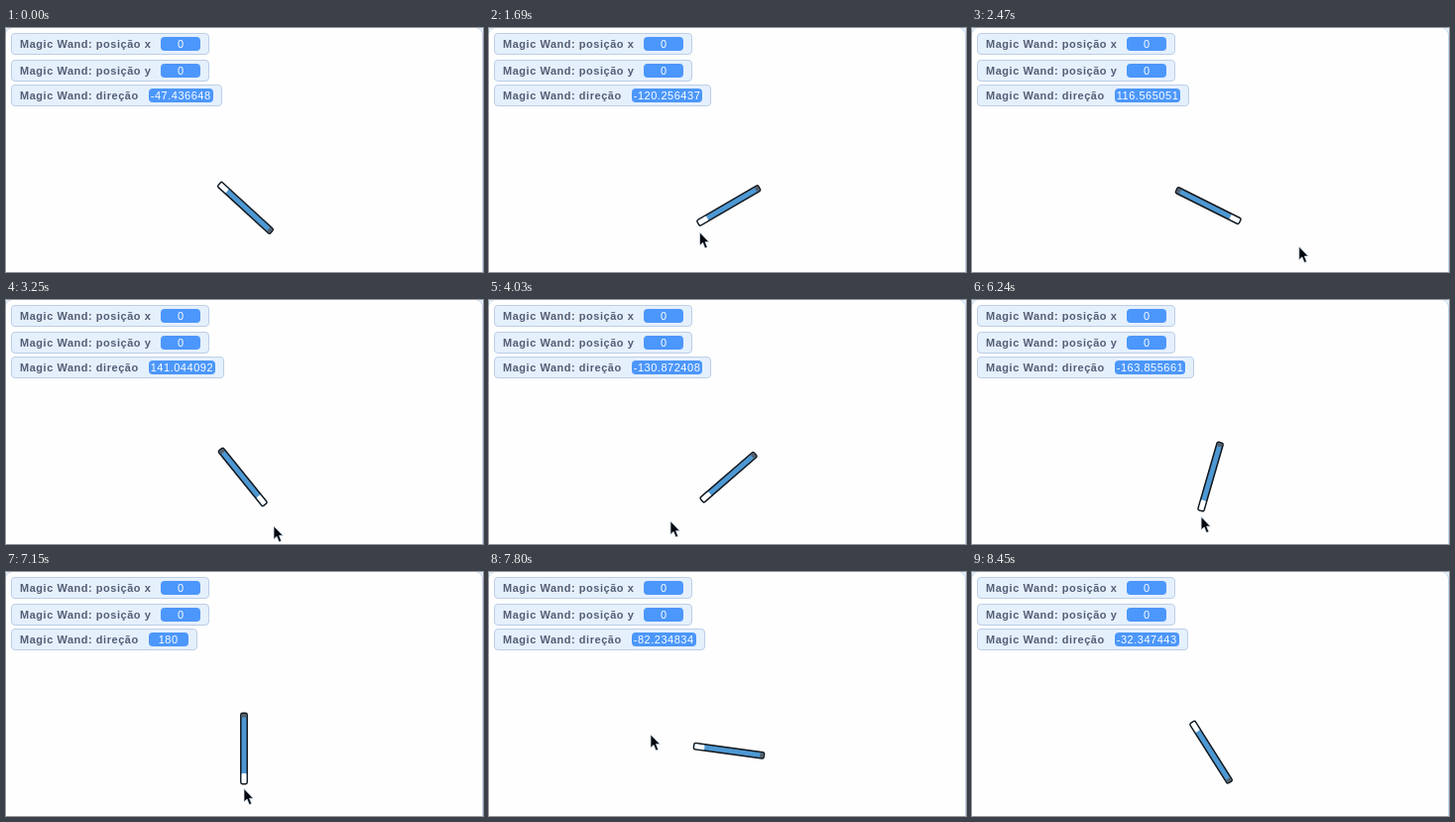
An HTML page for the animation above (8.58 s loop, 481 by 246 pixels).

```html
<!DOCTYPE html>
<html lang="pt">
<head>
<meta charset="utf-8">
<title>Magic Wand</title>
<style>
  html, body { margin: 0; width: 100%; height: 100%; overflow: hidden; background: #e5f0ff; }
  .view { position: relative; width: 100%; height: 100%; overflow: hidden; }
  .stage {
    position: absolute; inset: -1px 0 -10px -1px;
    background: #fefefe; border: 1px solid #c6d9f1; border-radius: 8px;
  }
  .monitor {
    position: absolute; left: 5px; height: 22px; box-sizing: border-box; padding: 3px;
    display: flex; white-space: nowrap;
    font: 11px/14px "Liberation Sans", Arial, sans-serif; letter-spacing: .53px;
    background: #e5f0fd; border: 1px solid #bccfe6; border-radius: 4px;
  }
  .monitor b { margin: 0 5px; color: #535e75; }
  .monitor span {
    min-width: 40px; box-sizing: border-box; margin: 0 5px; padding: 0 2px;
    color: #fff; background: #4c97fb; border-radius: 4px; text-align: center;
  }
  svg { position: absolute; inset: 0; width: 100%; height: 100%; }
</style>
</head>
<body>
<div class="view">
  <div class="stage"></div>
  <svg>
    <g id="wand">
      <rect x="-3.2" y="-33.7" width="6.4" height="71.4" rx="1.6" fill="#4d98d3" stroke="#14171c" stroke-width="1.5"/>
      <rect x="-2.4" y="-32.9" width="4.8" height="10" rx=".8" fill="#fff"/>
      <rect x="-2.4" y="33.5" width="4.8" height="3.4" rx=".8" fill="#56616c"/>
    </g>
  </svg>
  <div class="monitor" style="top:5px"><b>Magic Wand: posição x</b><span>0</span></div>
  <div class="monitor" style="top:32px"><b>Magic Wand: posição y</b><span>0</span></div>
  <div class="monitor" style="top:57px"><b>Magic Wand: direção</b><span id="direction"></span></div>
  <svg>
    <path id="cursor" d="M0 .5V13.8L3.1 11L5.3 16.5L7.7 15.6L5.5 10.2H9.4Z"
          fill="#05090f" stroke="#d9e8f7" stroke-width=".7"/>
  </svg>
</div>
<script>
  const STEP = 130, STEPS = 66, LEAD = .5;
  const CENTER = { x: 240, y: 180 };

  // Pointer sweep: step, x, y
  const path = [
    [8.5, 44, -25], [11, 130, 170], [13, 204, 201], [15, 238, 219], [20, 340, 220],
    [25, 278, 227], [30, 198, 231], [35, 148, 203], [38, 180, 212], [48, 229, 218],
    [53, 250, 218], [55, 240, 218], [57, 240, 218], [62, 130, 140], [65, 126, -17]
  ];

  const wand = document.getElementById('wand');
  const cursor = document.getElementById('cursor');
  const readout = document.getElementById('direction');
  const clamp = (v, min, max) => Math.max(min, Math.min(max, v));

  function pointerAt(step) {
    const s = clamp(step, path[0][0], path.at(-1)[0]);
    const i = Math.max(1, path.findIndex(p => p[0] >= s));
    const [s0, x0, y0] = path[i - 1], [s1, x1, y1] = path[i];
    const k = (s - s0) / (s1 - s0);
    return { x: x0 + (x1 - x0) * k, y: y0 + (y1 - y0) * k };
  }

  // Degrees clockwise from up, using whole stage coordinates
  function headingTo(p) {
    const dx = clamp(Math.round(p.x - CENTER.x), -240, 240) + 0;
    const dy = clamp(Math.round(CENTER.y - p.y), -180, 180) + 0;
    return Math.atan2(dx, dy) * 180 / Math.PI;
  }

  function draw(time) {
    const step = Math.floor(time / STEP) % STEPS;
    const heading = headingTo(pointerAt(step));
    const tip = pointerAt(step + LEAD); // the wand trails the visible pointer
    cursor.setAttribute('transform', `translate(${tip.x} ${tip.y})`);
    wand.setAttribute('transform', `translate(${CENTER.x} ${CENTER.y}) rotate(${heading})`);
    readout.textContent = Number(heading.toFixed(6));
  }

  let start;
  function tick(now) {
    start ??= now;
    draw(Math.max(0, now - start));
    requestAnimationFrame(tick);
  }
  draw(0);
  requestAnimationFrame(tick);
</script>
</body>
</html>
```
